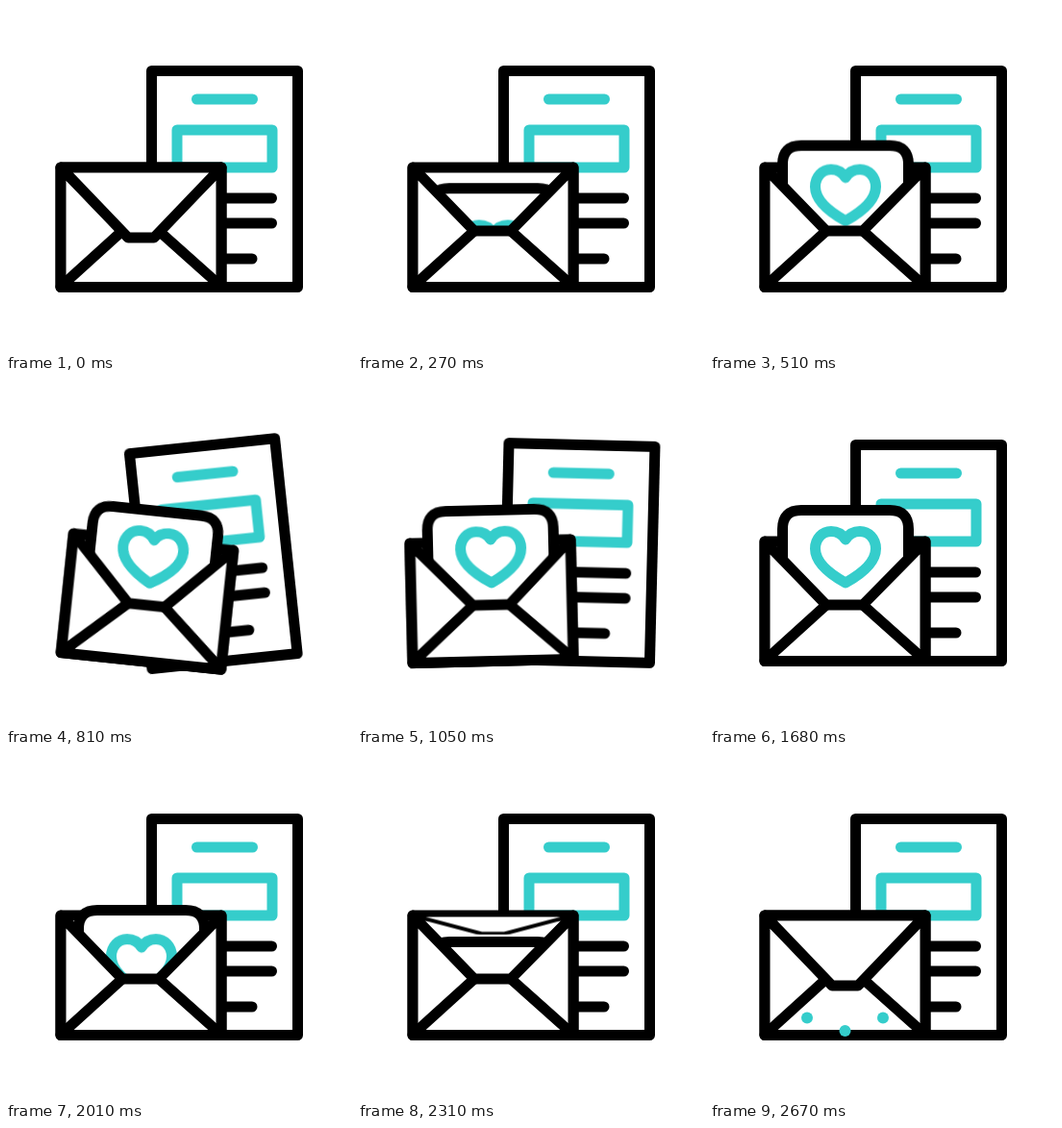
These frames come from a looping animation (360x360 px, 2700 ms). An HTML page:

```html
<!DOCTYPE html>
<html lang="en">
<head>
<meta charset="utf-8">
<title>Love letter</title>
<style>
  html, body { margin: 0; width: 100%; height: 100%; overflow: hidden; background: #fff; }
  svg { display: block; width: 100vw; height: 100vh; }

  .ink, .teal { fill: none; stroke-width: 11; stroke-linecap: round; stroke-linejoin: round; }
  .ink { stroke: #000; }
  .teal { stroke: #35cdcb; }
  .paper { fill: #fff; }

  .page, .envelope, .card, .heart, .flap, .dots {
    animation: 2700ms cubic-bezier(.37, 0, .63, 1) infinite;
  }
  .page { --tilt: -6deg; transform-origin: 227.5px 292px; animation-name: shake; }
  .envelope { --tilt: 6deg; transform-origin: 140.5px 292px; animation-name: shake; }
  .card { --drop: 60px; animation-name: slide; }
  .heart { --drop: 78px; animation-name: slide; }
  .flap { transform-origin: 140.5px 168px; animation-name: fold; }
  .dots { fill: #35cdcb; animation-name: blink; animation-timing-function: step-end; }

  @keyframes shake {
    0%, 20%, 26.667%, 33.333%, 40%, 47.407%, 54.444%, 61.111%, 100% { transform: rotate(0deg); }
    23.333%, 36.667%, 51.111% { transform: rotate(calc(var(--tilt) * -1)); }
    30%, 43.704%, 57.778% { transform: rotate(var(--tilt)); }
  }
  @keyframes slide {
    0%, 6.667%, 83.333%, 100% { transform: translateY(var(--drop)); }
    23.333%, 66.667% { transform: translateY(0); }
  }
  @keyframes fold {
    0%, 92.222%, 100% { transform: scaleY(1); }
    8.889%, 82.222% { transform: scaleY(0); }
  }
  @keyframes blink {
    0% { opacity: 0; }
    98.4%, 100% { opacity: 1; }
  }
</style>
</head>
<body>
<svg viewBox="0 0 360 360">
  <g class="page">
    <path class="ink paper" d="M151.5 67.5H303.5V292.5H151.5Z"/>
    <path class="teal" d="M198.5 97H256.5M178 129H277V168H178Z"/>
    <path class="ink" d="M178 200H276.5M178 226H276.5M178 263H256"/>
  </g>
  <g class="envelope">
    <path class="ink paper" d="M57 168H224V292.5H57Z"/>
    <path class="card ink paper" d="M75.5 232V155Q75.5 135.5 95 135.5H187Q206.5 135.5 206.5 155V232"/>
    <path class="heart teal" d="M141 211C132 206 109.500 193 109.500 175.500C109.500 165 117 157.500 126 157.500C133 157.500 138 161 141 166C144 161 149 157.500 156 157.500C165 157.500 172.500 165 172.500 175.500C172.500 193 150 206 141 211Z"/>
    <path class="ink paper" d="M57 168L121 234H159L224 168V292.5H57Z"/>
    <path class="ink" d="M57 292L121 234M159 234L224 292"/>
    <path class="flap ink paper" d="M57 168L127 241H154L224 168Z"/>
    <g class="dots">
      <circle cx="101" cy="274.500" r="6"/>
      <circle cx="140.500" cy="288" r="6"/>
      <circle cx="180" cy="274.500" r="6"/>
    </g>
  </g>
</svg>
</body>
</html>
```
